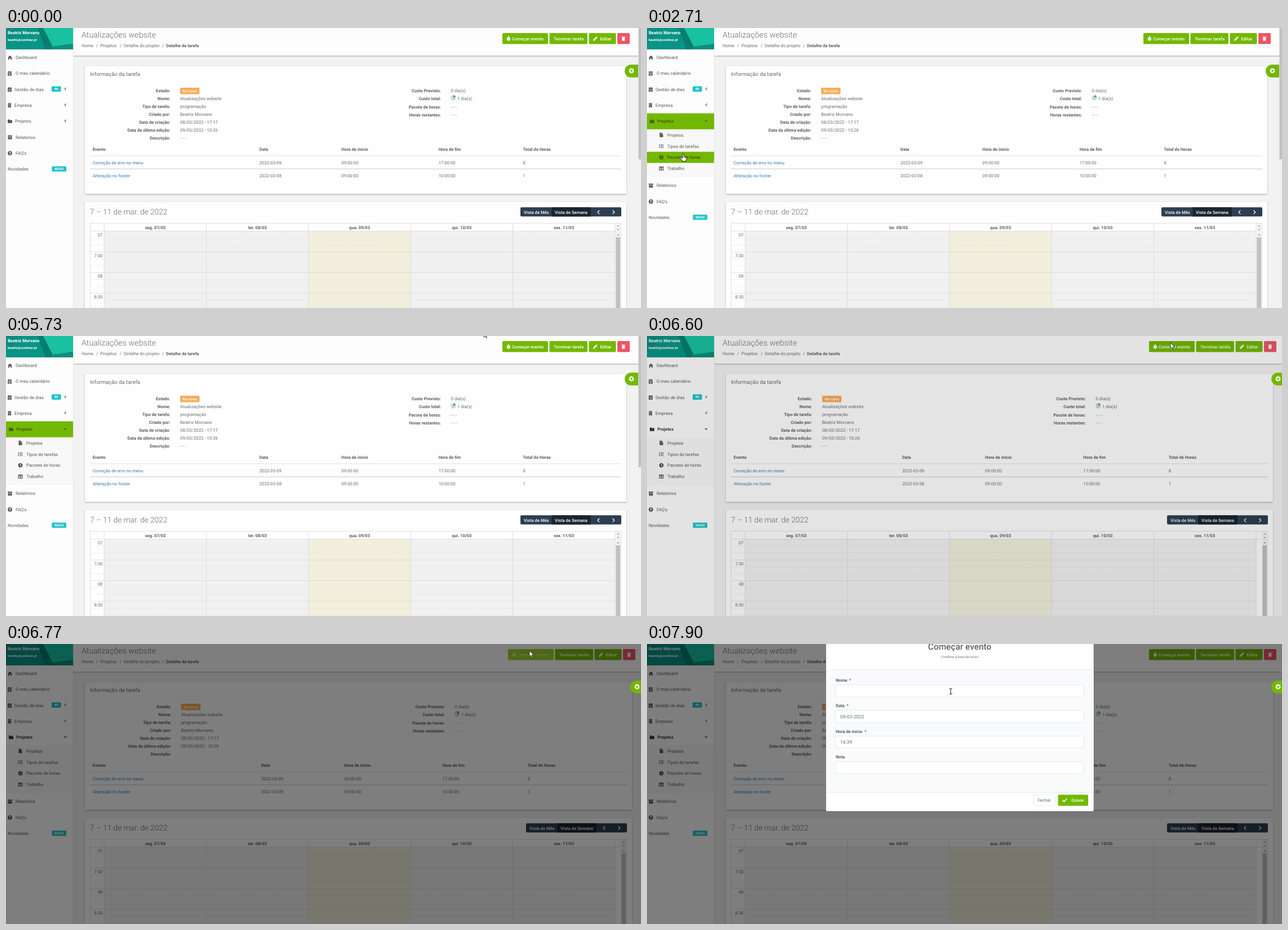
Recreate the animation shown at these times as an HTML page. Size 1127 by 497 pixels, loop 8000 ms.

```html
<!DOCTYPE html>
<html lang="pt">
<head>
<meta charset="utf-8">
<title>Detalhe da tarefa</title>
<style>
html, body { margin: 0; width: 100%; height: 100%; overflow: hidden; background: #f2f2f2; }
svg { display: block; width: 1127px; height: 497px; font-family: Roboto, Arial, sans-serif; text-rendering: geometricPrecision; cursor: default; }
text { white-space: pre; }
.card { filter: drop-shadow(0 1px 1px rgba(0,0,0,.33)); }
</style>
</head>
<body>
<svg id="stage" viewBox="0 0 1127 497"></svg>
<script>
const LOOP = 8000, GREEN = '#72b800', GREY = '#676a6c', SIDE = '#55585a', TEAL = '#1fc3c9';
const USER = 'Beatriz Morvano', MAIL = 'beatriz@uvolmar.pt';

const clamp = v => Math.max(0, Math.min(1, v));
const progress = (t, from, to) => clamp((t - from) / (to - from));
const smooth = p => p * p * (3 - 2 * p);

// y is the vertical middle of the line
const text = (x, y, s, size = 7.8, fill = GREY, weight = 400, anchor = 'start') =>
  `<text x="${x}" y="${y + size * .36}" font-size="${size}" fill="${fill}" font-weight="${weight}" text-anchor="${anchor}">${s}</text>`;
const bold = (x, y, s, fill = '#5c5f61', anchor) => text(x, y, s, 7.6, fill, 700, anchor);
const rect = (x, y, w, h, fill, more = '') => `<rect x="${x}" y="${y}" width="${w}" height="${h}" fill="${fill}" ${more}/>`;
const path = (d, fill, more = '') => `<path d="${d}" fill="${fill}" ${more}/>`;
const stroke = (d, color, width = 1) => path(d, 'none', `stroke="${color}" stroke-width="${width}"`);
const group = (x, y, content, more = '') => `<g transform="translate(${x} ${y})" ${more}>${content}</g>`;

const DISC = 'M4 0a4 4 0 1 0 .01 0Z';
const ICONS = {
  home: 'M0 4.2 4 .5 8 4.2H7V8H5V5.4H3V8H1V4.2Z',
  calendar: 'M0 1H1V0H2.2V1H4.8V0H6V1H7V3H0ZM0 3.6H7V8H0ZM2 5V6.4H5V5Z',
  building: 'M.5 0H6V8H4V6.4H2.6V8H.5ZM1.6 1.2V2.2H2.6V1.2ZM4 1.2V2.2H5V1.2ZM1.6 3.6V4.6H2.6V3.6ZM4 3.6V4.6H5V3.6Z',
  folder: 'M0 1H3L4 2H8V7.2H0Z',
  archive: 'M0 .6H8V2.5H0ZM.5 3H7.5V7.5H.5ZM2.8 3.8V4.7H5.2V3.8Z',
  help: DISC + 'M2.4 3Q2.5 1.7 4 1.7 5.6 1.7 5.6 3 5.6 3.8 4.6 4.4V5H3.4V4Q4.4 3.5 4.4 3 4.4 2.7 4 2.7 3.6 2.7 3.5 3.2ZM3.4 5.5H4.6V6.6H3.4Z',
  file: 'M1 0H4.3V2.7H7V8H1ZM4.8 0 7 2.2H4.8Z',
  list: 'M0 .8H1.5V2.2H0ZM2.5 1H8V2H2.5ZM0 3.3H1.5V4.7H0ZM2.5 3.5H8V4.5H2.5ZM0 5.8H1.5V7.2H0ZM2.5 6H8V7H2.5Z',
  clock: DISC + 'M3.5 1.5H4.4V4L5.8 5.2 5.2 5.9 3.5 4.5Z',
  table: 'M0 .6H8V7.5H0ZM1 2.6V4H3.5V2.6ZM4.5 2.6V4H7V2.6ZM1 5V6.5H3.5V5ZM4.5 5V6.5H7V5Z',
  timer: 'M2.6 0H5.2V.9H4.5V1.5A3.3 3.3 0 1 1 3.3 1.5V.9H2.6ZM3.5 2.8V5H4.3V2.8Z',
  pencil: 'M0 8 .4 5.7 5 1 7 3 2.3 7.6ZM5.6 .5 6.2 0 8 1.8 7.5 2.4Z',
  trash: 'M.8 .8H2.8V.2H5.2V.8H7.2V1.8H.8ZM1.3 2.3H6.7L6.4 8H1.6Z'
};
const icon = (name, x, y, fill = SIDE) => group(x, y - 4, path(ICONS[name], fill, 'fill-rule="evenodd"'));

const MENU = [
  ['home', 'Dashboard', 17], ['calendar', 'O meu calendário', 17], ['calendar', 'Gestão de dias', 15],
  ['building', 'Empresa', 15], ['folder', 'Projetos', 16], ['archive', 'Relatórios', 17],
  ['help', "FAQ's", 17], ['', 'Novidades', 3]
];
const SUBMENU = [['file', 'Projetos'], ['list', 'Tipos de tarefas'], ['clock', 'Pacotes de horas'], ['table', 'Trabalho']];
const ROW = 28.35, SUB_TOP = 179.8, SUB_HEIGHT = 85.7;

// Pointer routes as [time, x, y]; between routes the pointer is away
const ROUTES = [
  [[120, 1011, 487], [820, 97, 228], [1140, 97, 228], [1280, 91, 198], [1450, 91, 198], [1830, 70, 168],
   [2420, 70, 168], [2710, 64, 223], [2940, 51, 250], [3030, 51, 250], [3170, 39, 253], [3800, 39, 253],
   [4180, 168, 95], [4330, 142, 21], [4480, 142, 21], [4730, 241, 13], [5270, 241, 13], [5420, 275, -9]],
  [[5730, 848, -8], [6200, 929, 12], [7360, 929, 12]],
  [[7590, 526, 7], [7900, 539, 84], [8001, 539, 84]]
];

function pointerAt(t) {
  for (const route of ROUTES)
    for (let i = 1; i < route.length; i++) {
      const [t0, x0, y0] = route[i - 1], [t1, x1, y1] = route[i];
      if (t < t0 || t >= t1) continue;
      const p = smooth(progress(t, t0, t1));
      return { x: x0 + (x1 - x0) * p, y: y0 + (y1 - y0) * p };
    }
  return { x: -99, y: -99 };
}

const inside = (p, x, y, w, h) => p.x >= x && p.x < x + w && p.y >= y && p.y < y + h;

function pointer(p, t) {
  const overButton = t < 6450 && inside(p, 881, 9, 81, 20);
  if (overButton || inside(p, 0, 38, 119, 312))
    return group(p.x, p.y, path('M-1.2 1Q-1.2-.4 0-.4T1.2 1V4.6Q2.6 4.2 3 5.2 4.4 4.8 4.7 5.9 6 5.8 6 7.2V9.4Q6 11 4.8 12V13.6H-1.6V12.2L-4.7 8.2Q-5.3 7-4.3 6.5-3.3 6.2-2.4 7.3L-1.2 8.5Z', '#fff', 'stroke="#111" stroke-width=".9"') +
      stroke('M1.2 5V7.6M3 5.4V7.8M4.6 6V8', '#111', .6));
  if (inside(p, 134, 5, 132, 14) || (t > 7400 && p.y > 72))
    return group(p.x, p.y, stroke('M-2.5-4.7H-.7L0-4.2.7-4.7H2.5M0-4.2V4.2M-2.5 4.7H-.7L0 4.2.7 4.7H2.5', '#111', 1));
  return group(p.x, p.y, path('M0 0V10.2L2.4 8 4 11.6 5.8 10.8 4.2 7.3H7.4Z', '#fff', 'stroke="#111" stroke-width=".8"'));
}

function sidebar(t, p) {
  const open = t >= 2210, reveal = smooth(progress(t, 2210, 2540)), focus = open && t < 6450;
  const lit = '#48620f';
  let out = rect(0, 0, 119, 497, '#fdfdfd') + rect(119, 0, 1, 497, '#e6e6e6') +
    rect(0, 0, 119, 38, '#089486') + path('M0 0H30L0 30Z', '#0b8b82') + path('M56 0H66L83 33 78 38H70Z', '#077e72') +
    path('M66 0H119V28L83 33Z', '#19c1a1') + path('M83 33 119 28V38H78Z', '#0b8f7c') +
    bold(3, 8, USER, '#fff') + text(3, 20.5, MAIL, 5.9, '#fff', 700);

  if (open) {
    let sub = rect(0, SUB_TOP, 119, SUB_HEIGHT, '#f8f8f8');
    SUBMENU.forEach(([name, label], i) => {
      const y = 189.8 + 19.9 * i, hover = reveal > .9 && inside(p, 0, y - 9.9, 119, 19.8);
      if (hover) sub += rect(0, y - 9.9, 119, 19.8, GREEN);
      sub += icon(name, 21.5, y, hover ? lit : SIDE) + (hover ? bold(36, y, label, lit) : text(36, y, label, 7.8, SIDE));
    });
    out += `<clipPath id="fold">${rect(0, SUB_TOP, 119, SUB_HEIGHT * reveal, '#000')}</clipPath><g clip-path="url(#fold)">${sub}</g>`;
  }

  MENU.forEach(([name, label, x], i) => {
    const y = 52.2 + ROW * i + (i > 4 ? SUB_HEIGHT * reveal : 0), active = open && i === 4;
    const hover = inside(p, 0, y - ROW / 2, 119, ROW), green = hover || (active && focus);
    const color = green ? lit : active ? '#37393b' : SIDE;
    if (green) out += rect(0, y - ROW / 2, 119, ROW, GREEN);
    if (name) out += icon(name, active ? 5 : 3, y, color);
    out += hover || active ? bold(active ? 18.5 : x, y, label, color) : text(x, y, label, 7.8, color);
    if (i > 1 && i < 5) out += stroke(active ? `M102.8 ${y - 1.8}l2.2 2.2 2.2-2.2` : `M106.4 ${y - 3}l-2.2 2.2 2.2 2.2`, color, 1.1);
    if (i === 2) out += rect(81, y - 5.5, 16.5, 9.5, TEAL, 'rx="1.2"') + text(89.2, y - .8, '46', 6, '#fff', 700, 'middle');
    if (i === 7) out += rect(81.5, y - 5.2, 25.5, 9.3, TEAL, 'rx="1.2"') + text(94.3, y - .6, 'NOVO', 5.9, '#fff', 700, 'middle');
  });
  return out;
}

function header(t, p, shift) {
  const busy = t >= 6690 && t < 6850, hover = t < 6450 && inside(p, 881, 9, 81, 20);
  const button = (x, w, fill) => rect(x, 9, w, 19.5, fill, 'rx="1.8"');
  const label = (x, s) => text(x, 18.8, s, 7.7, '#fff', 500);
  return rect(120, 0, 1007, 49, '#fdfdfd', 'class="card"') +
    text(134, 11.5, 'Atualizações website', 14.3, GREY, 300) +
    [['Home', 134], ['/', 160], ['Projetos', 167.5], ['/', 202], ['Detalhe do projeto', 209], ['/', 277]]
      .map(([s, x]) => text(x, 31.2, s)).join('') + bold(284, 31.2, 'Detalhe da tarefa') +
    group(shift, 0,
      button(881, 81, busy ? '#9ad22a' : hover ? '#67a600' : GREEN) +
      `<g opacity="${busy ? .5 : 1}">${icon('timer', 888, 18.8, '#fff')}${label(898, 'Começar evento')}</g>` +
      button(964.5, 67.5, GREEN) + label(972, 'Terminar tarefa') +
      button(1034.5, 48, GREEN) + icon('pencil', 1042, 18.8, '#fff') + label(1054.5, 'Editar') +
      button(1085, 22, '#ed5565') + icon('trash', 1091.8, 18.8, '#fff'));
}

function details(shift) {
  const sx = x => x + shift * (x - 149) / 943;
  const field = (x, gap, y, label, value) => bold(sx(x), y, label, undefined, 'end') + text(sx(x + gap), y, value);
  let out = rect(140, 67.5, 961 + shift, 227, '#fefefe', 'class="card"') + text(149, 82, 'Informação da tarefa', 9.5);
  [['Estado:', ''], ['Nome:', 'Atualizações website'], ['Tipo de tarefa:', 'programação'], ['Criado por:', USER],
   ['Data de criação:', '08/03/2022 - 17:17'], ['Data da última edição:', '09/03/2022 - 10:26'], ['Descrição:', '- - -']]
    .forEach(([label, value], i) => out += field(291.5, 17.5, 111.3 + 14 * i, label, value));
  out += rect(sx(309), 106, 34.5, 11.5, '#f8ac59', 'rx="1.4"') + text(sx(326.2), 112, 'Em curso', 6, '#fff', 700, 'middle');

  out += field(772, 17.5, 111.3, 'Custo Previsto:', '0 dia(s)') + field(772, 29, 125.5, 'Custo total:', '1 dia(s)') +
    field(772, 17.5, 140.4, 'Pacote de horas:', '- - -') + field(772, 17.5, 154.4, 'Horas restantes:', '- - -') +
    group(sx(794), 124, '<circle r="4.8" fill="#d3d5d5"/>' + path('M0 0V-4.8A4.8 4.8 0 0 1 4.2-2.3Z', '#1ab394'));

  const columns = [153.7, 449.7, 595.3, 767.7, 917.6].map(sx);
  ['Evento', 'Data', 'Hora de ínicio', 'Hora de fim', 'Total de Horas'].forEach((s, i) => out += bold(columns[i], 215.5, s));
  [['Correção de erro no menu', '2022-03-09', '09:00:00', '17:00:00', '8'],
   ['Alteração no footer', '2022-03-08', '09:00:00', '10:00:00', '1']].forEach((row, r) =>
    row.forEach((s, i) => out += text(columns[i], 238.8 + 23.8 * r, s, 7.8, i ? GREY : '#337ab7')));
  return out + rect(149, 226.4, 943 + shift, .9, '#dcdcdc') + rect(149, 249.4, 943 + shift, 1.4, '#d8d8d8');
}

function calendar(shift) {
  const right = 1092 + shift, line = '#d9d9d9', white = '#fff';
  let out = rect(140, 309, 961 + shift, 200, '#fefefe', 'class="card"') + text(149, 326, '7 – 11 de mar. de 2022', 13.65, GREY, 300);
  out += group(shift, 0, rect(913, 318.3, 179, 16.2, '#2c3e50', 'rx="2"') + rect(968.5, 318.3, 69.5, 16.2, '#1a252f') +
    text(919, 327.3, 'Vista de Mês', 7.7, white, 500) + text(974, 327.3, 'Vista de Semana', 7.7, white, 500) +
    stroke('M1053.3 323.8l-3.3 3.3 3.3 3.3M1076.5 323.8l3.3 3.3-3.3 3.3', white, 1.3));

  out += rect(174, 361, 907, 136, '#f1f1f1') + rect(537, 361, 181, 136, '#f2efdc');
  for (let i = 1; i < 12; i++) {
    const y = 361 + 12.2 * i, major = i % 3 === 0;
    out += path(`M149 ${y}H1081`, 'none', `stroke="${major ? line : '#e2e2e2'}" stroke-width=".8" ${major ? '' : 'stroke-dasharray="1 .6"'}`);
  }
  ['07', '7:30', '08', '8:30'].forEach((s, i) => out += text(171.5, 367 + 36.7 * i, s, 7.8, GREY, 400, 'end'));
  ['seg. 07/03', 'ter. 08/03', 'qua. 09/03', 'qui. 10/03', 'sex. 11/03'].forEach((s, i) => {
    const x = 174.2 + 181.3 * i;
    out += stroke(`M${x} 346.5V497`, line, .8) + bold(x + 90.8, 353.8, s, undefined, 'middle');
  });
  out += stroke(`M149 346.5H${right}M149 360.6H${right}M149.4 346.5V497M${right - .4} 346.5V497M1081 346.5V497`, line, .8);
  return out + group(shift, 0, rect(1081.5, 347, 10, 150, '#f2f2f2') + rect(1082.3, 371.5, 7.8, 126, '#c1c1c1') +
    path('M1084.6 352 1086.4 350 1088.2 352ZM1084.6 357 1086.4 359 1088.2 357ZM1084.4 368 1086.4 365.8 1088.4 368Z', '#888'));
}

function dialog(t) {
  const p = progress(t, 6790, 7060);
  if (!p) return '';
  let out = rect(317.5, -40, 475.5, 337, '#fff', 'rx="2" stroke="#000" stroke-opacity=".25" stroke-width="1"') +
    rect(318, 46, 474.5, 218, '#f8fafb') + rect(318, 45.5, 474.5, .8, '#e6e6e6') + rect(318, 263.5, 474.5, .8, '#e6e6e6') +
    text(555, 4.5, 'Começar evento', 15.4, '#5e6163', 500, 'middle') + text(555, 22.3, 'Confime a hora de início', 6.15, GREY, 400, 'middle');
  [['Nome', 358.5, ''], ['Data', 354.2, '09-03-2022'], ['Hora de início', 386, '16:39'], ['Nota', 0, '']].forEach(([label, star, value], i) => {
    const y = 64 + 45.4 * i;
    out += bold(335, y, label) + (star ? bold(star, y, '*') : '') +
      rect(335, y + 8.7, 439.5, 21.2, '#fff', 'stroke="#e3e4e6" stroke-width=".8"') + text(343, y + 19.2, value, 8.45);
  });
  out += rect(685.5, 267.7, 39, 19.3, '#fff', 'rx="1.8" stroke="#e3e5e7" stroke-width=".8"') + text(705, 277.5, 'Fechar', 7.8, GREY, 400, 'middle') +
    rect(729.5, 267.5, 53.5, 19.7, GREEN, 'rx="1.8"') + stroke('M737.5 277.2l2.6 2.6 5-5', '#fff', 1.7) + text(753, 277.5, 'Gravar', 7.7, '#fff', 500);
  return group(0, -75 * (1 - p) ** 2, out, `opacity="${clamp(p * 1.8)}"`);
}

function scene(t) {
  const p = pointerAt(t), shift = t >= 6530 ? 10 : 0;
  const dim = .5 * progress(t, 6565, 6740);
  return rect(0, 0, 1127, 497, '#f2f2f2') + header(t, p, shift) + details(shift) + calendar(shift) + sidebar(t, p) +
    (shift ? '' : rect(1122, 0, 5, 497, '#f1f1f1') + rect(1122.5, 0, 4.5, 233, '#c1c1c1')) +
    (dim ? rect(0, 0, 1127, 497, '#000', `opacity="${dim}"`) : '') +
    group(shift, 0, path('M1122 65H1109.5a11.4 11.4 0 0 0 0 22.8H1122Z', GREEN) +
      '<circle cx="1110" cy="76" r="4.4" fill="#fff"/>' + stroke('M1107.5 76H1112.5M1110 73.5V78.5', GREEN, 1.3)) +
    dialog(t) + pointer(p, t);
}

const stage = document.getElementById('stage');
let shown = '';
function draw() {
  const next = scene(performance.now() % LOOP);
  if (next !== shown) stage.innerHTML = shown = next;
  requestAnimationFrame(draw);
}
draw();
</script>
</body>
</html>
```
